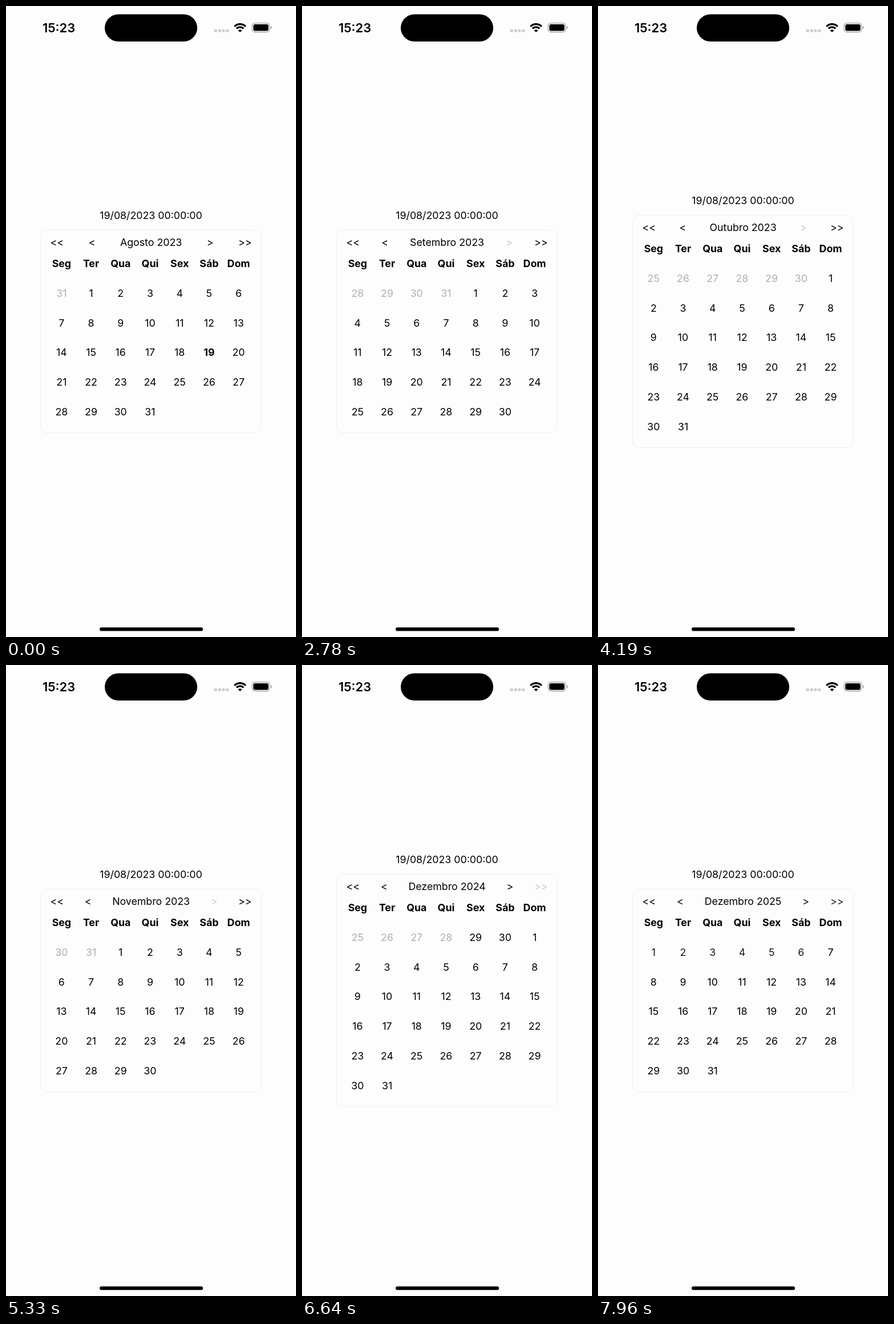
Write an HTML page that moves like this. It is 508x1102 px and loops after 8000 ms.

```html
<!DOCTYPE html>
<html lang="pt">
<head>
<meta charset="utf-8">
<title>Calendário</title>
<style>
  html, body { margin: 0; width: 100%; height: 100%; overflow: hidden; background: #fdfdfd; }
  body { position: relative; color: #000; font: 17.75px/24px Inter, sans-serif; }
  svg { position: absolute; left: 0; top: 0; }
  #clock { position: absolute; left: 32.5px; width: 120px; top: 26px; text-align: center; font-size: 21.9px; font-weight: 600; }
  #picker { position: absolute; left: 0; top: 0; width: 508px; }
  #date { position: absolute; left: 0; width: 508px; top: 354px; text-align: center; }
  #card { position: absolute; left: 60px; top: 391px; width: 388px; box-sizing: border-box; border: 1px solid #eee; border-radius: 12px; }
  #head { position: absolute; left: 77.6px; width: 353px; top: 401px; display: flex; justify-content: space-between; }
  .cell { position: absolute; width: 51.7px; text-align: center; }
  .bold { font-weight: 700; }
</style>
</head>
<body>
<svg width="508" height="1102" viewBox="0 0 508 1102">
  <rect x="173" y="14.5" width="162" height="47.5" rx="23.75"/>
  <rect x="164" y="1085.3" width="181" height="6.2" rx="3.1"/>
  <path d="M365 43.2h4.8m2 0h4.8m2 0h4.8m2 0h4.8" stroke="#cacaca" stroke-width="4.6"/>
  <g fill="none" stroke="#000" stroke-width="3.3">
    <path d="M400.2 35.8a13.8 13.8 0 0 1 19.6 0"/>
    <path d="M403.8 39.4a8.7 8.7 0 0 1 12.4 0"/>
  </g>
  <path d="M410 46l-3.4-3.5a4.9 4.9 0 0 1 6.8 0z"/>
  <rect x="431" y="29.8" width="31" height="15.8" rx="4.8" fill="none" stroke="#9d9d9d" stroke-width="1.2"/>
  <rect x="433.2" y="32" width="26.6" height="11.4" rx="3"/>
  <path d="M463.8 35.2q2 .9 2 2.5t-2 2.5z" fill="#9d9d9d"/>
</svg>
<div id="clock">15:23</div>
<div id="picker">
  <div id="date">19/08/2023 00:00:00</div>
  <div id="card"></div>
  <div id="head"><span>&lt;&lt;</span><span>&lt;</span><span id="title"></span><span id="next">&gt;</span><span id="nextYear">&gt;&gt;</span></div>
  <div id="week"></div>
  <div id="days"></div>
</div>
<script>
const LOOP = 8000, STEP = 86, STEPS = 4, PITCH = 51.7;
const PRESSED = 0.2, OUTSIDE = 0.3;
const MONTHS = 'Janeiro Fevereiro Março Abril Maio Junho Julho Agosto Setembro Outubro Novembro Dezembro'.split(' ');
const WEEK = 'Seg Ter Qua Qui Sex Sáb Dom'.split(' ');
const START = { year: 2023, month: 7 };

// press time, release time, button
const TAPS = [
  [500, 670, 'next'],
  [2780, 2960, 'next'],
  [4190, 4360, 'next'],
  [5330, 5500, 'next'],
  [6290, 6560, 'nextYear'],
  [7440, 7700, 'nextYear']
];

const $ = id => document.getElementById(id);
const mix = (a, b, p) => a + (b - a) * p;
const ease = p => p < 0.5 ? 2 * p * p : 1 - 2 * (1 - p) * (1 - p);
const leadOf = v => (new Date(v.year, v.month, 1).getDay() + 6) % 7;
const advance = (v, button) => {
  const n = v.year * 12 + v.month + (button === 'next' ? 1 : 12);
  return { year: Math.floor(n / 12), month: n % 12 };
};

function addCell(parent, text, col, y, bold) {
  const cell = document.createElement('div');
  cell.className = bold ? 'cell bold' : 'cell';
  cell.textContent = text;
  cell.style.left = 71.5 + col * PITCH + 'px';
  cell.style.top = y - 12 + 'px';
  parent.append(cell);
}

function buildMonth(v) {
  const lead = leadOf(v);
  const total = lead + new Date(v.year, v.month + 1, 0).getDate();
  const extra = Math.ceil(total / 7) - 5;
  $('title').textContent = `${MONTHS[v.month]} ${v.year}`;
  $('picker').style.top = -26 * extra + 'px';
  $('card').style.height = 355 + 52 * extra + 'px';
  $('days').replaceChildren();
  for (let i = 0; i < total; i++) {
    const day = new Date(v.year, v.month, 1 + i - lead);
    const chosen = day.getFullYear() === 2023 && day.getMonth() === 7 && day.getDate() === 19;
    addCell($('days'), day.getDate(), i % 7, 502 + Math.floor(i / 7) * PITCH, chosen);
  }
}

function stateAt(t) {
  let view = START, before = START, p = 1;
  const buttons = { next: 1, nextYear: 1 };
  for (const [press, release, button] of TAPS) {
    if (t < press) break;
    if (t < release) {
      buttons[button] = PRESSED;
      break;
    }
    before = view;
    view = advance(view, button);
    p = ease(Math.min(STEPS, Math.floor((t - release) / STEP)) / STEPS);
    buttons[button] = mix(PRESSED, 1, p);
  }
  return { view, before, p, buttons };
}

let shown = '';
function render(t) {
  const { view, before, p, buttons } = stateAt(t);
  const key = `${view.year}-${view.month}`;
  if (key !== shown) {
    buildMonth(view);
    shown = key;
  }
  for (const id in buttons) $(id).style.opacity = buttons[id];
  const from = leadOf(before), to = leadOf(view);
  for (let i = 0; i < 7; i++) {
    const a = i < from ? OUTSIDE : 1, b = i < to ? OUTSIDE : 1;
    $('days').children[i].style.opacity = mix(a, b, p);
  }
}

WEEK.forEach((name, i) => addCell($('week'), name, i, 450, true));
const origin = performance.now();
function tick() {
  render((performance.now() - origin) % LOOP);
  requestAnimationFrame(tick);
}
tick();
</script>
</body>
</html>
```
